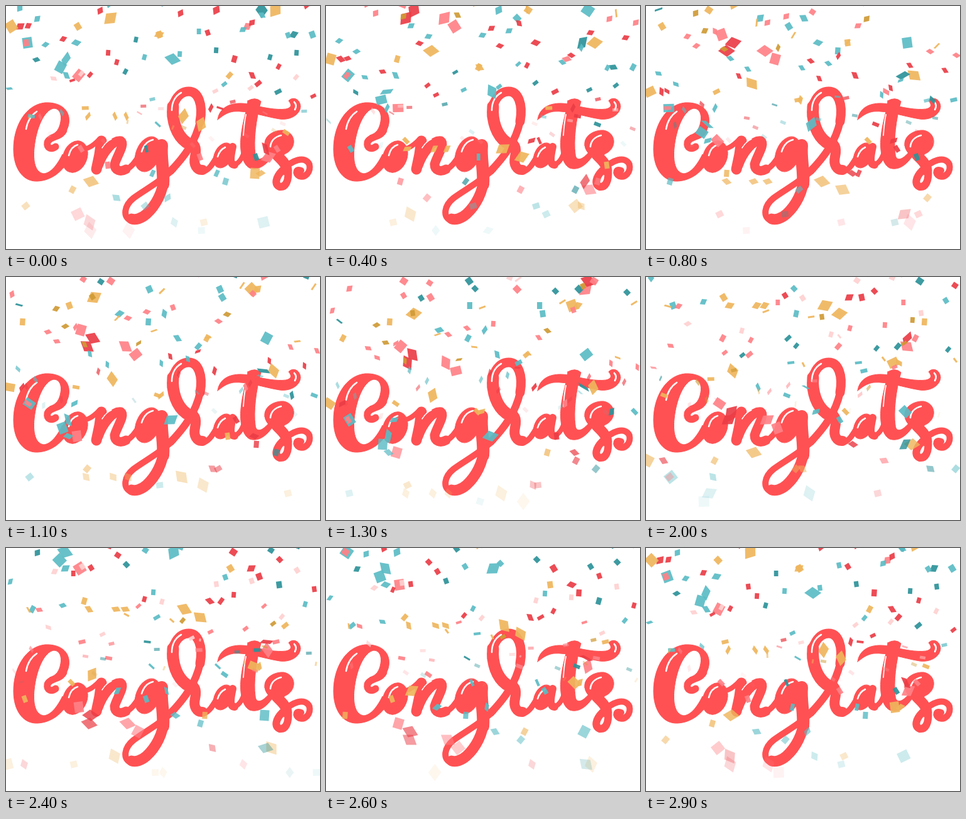
Animation, 500 px wide and 387 px high, one loop 3 s. Source, as an HTML page without scripts:

```html
<!DOCTYPE html>
<html lang="en">
<head>
<meta charset="utf-8">
<title>Congrats</title>
<style>
html, body { margin: 0; width: 500px; height: 387px; overflow: hidden; background: #fff; }
svg, .confetti { position: absolute; left: 0; top: 0; width: 500px; height: 387px; overflow: hidden; }

/* lettering */
.ink { fill: none; stroke: #ff5153; stroke-width: 12; stroke-linecap: round; stroke-linejoin: round; }
.ink .full { fill: #ff5153; stroke-width: 1; }
.shine { fill: none; stroke: #fff; stroke-width: 2.6; stroke-linecap: round; }

/* confetti: --x is the column, --a the age in tenths of a second at the start */
i {
  position: absolute; top: 0; left: calc(var(--x) * 1px);
  width: var(--s); height: var(--s); margin: calc(var(--s) / -2);
  background: var(--c); transform: skewX(var(--k));
  --s: 11px; --k: 0deg; --r: 10deg; --d: 8px; --flat: .5;
  animation: fall 3s steps(30) infinite, spin 3s steps(30) infinite,
             flip 3s steps(15) infinite, fade 3s steps(9) infinite;
  animation-delay: calc(var(--a) * -.1s);
}
.r { --c: #ea3d46; }
.p { --c: #ff8187; }
.t { --c: #5bbcc4; }
.o { --c: #efb55c; }
.d { --c: #2d9299; }
.b { --s: 17px; --flat: .75; }
i:nth-child(2n) { --d: -8px; }
i:nth-child(3n) { --k: -18deg; --r: 130deg; }
i:nth-child(5n) { --k: 16deg; --r: 65deg; }
i:nth-child(7n) { --r: 210deg; --flat: .25; }

/* small pieces, scattered by overlapping cycles */
.dust i {
  --s: 9px; --x: calc(var(--u) + var(--v)); --a: calc(var(--g) + var(--h)); --h: 0;
  margin-top: calc(var(--v) * .14px - 10px);
  animation-name: fall, spin, flip, wane;
}
.dust i:nth-child(5n) { --u: 0; }
.dust i:nth-child(5n+1) { --u: 200; }
.dust i:nth-child(5n+2) { --u: 400; }
.dust i:nth-child(5n+3) { --u: 100; }
.dust i:nth-child(5n+4) { --u: 300; }
.dust i:nth-child(7n) { --v: 8; }
.dust i:nth-child(7n+1) { --v: 64; }
.dust i:nth-child(7n+2) { --v: 22; }
.dust i:nth-child(7n+3) { --v: 92; }
.dust i:nth-child(7n+4) { --v: 36; }
.dust i:nth-child(7n+5) { --v: 78; }
.dust i:nth-child(7n+6) { --v: 50; }
.dust i:nth-child(6n) { --g: 0; }
.dust i:nth-child(6n+1) { --g: 15; }
.dust i:nth-child(6n+2) { --g: 5; }
.dust i:nth-child(6n+3) { --g: 25; }
.dust i:nth-child(6n+4) { --g: 10; }
.dust i:nth-child(6n+5) { --g: 20; }
.dust i:is(:nth-child(11n+1), :nth-child(11n+6)) { --h: 1; }
.dust i:is(:nth-child(11n+4), :nth-child(11n+8)) { --h: 2; }
.dust i:is(:nth-child(11n+2), :nth-child(11n+9)) { --h: 3; }
.dust i:is(:nth-child(11n+5), :nth-child(11n+10)) { --h: 4; }
.dust i:nth-child(4n) { --c: #ea3d46; }
.dust i:nth-child(4n+1) { --c: #efb55c; }
.dust i:nth-child(4n+2) { --c: #5bbcc4; }
.dust i:nth-child(4n+3) { --c: #ff8187; }
.dust i:nth-child(8n+5) { --c: #cf9a35; }
.dust i:nth-child(9n+2) { --c: #2d9299; }
.dust i:nth-child(9n+4) { --c: #ffd0d0; }
.dust i:nth-child(8n+1) { width: 3px; height: 13px; }

@keyframes fall { from { translate: 0 -20px; } to { translate: var(--d) 370px; } }
@keyframes spin { from { rotate: var(--r); } to { rotate: calc(var(--r) + 360deg); } }
@keyframes flip { 0%, 100% { scale: 1 1; } 50% { scale: 1 var(--flat); } }
@keyframes fade { 0%, 70% { opacity: .92; } 100% { opacity: 0; } }
@keyframes wane { 0%, 38% { opacity: .92; } 62%, 100% { opacity: 0; } }
</style>
</head>
<body>
<svg viewBox="0 0 500 387" role="img" aria-label="Congrats">
  <g class="ink">
    <!-- C -->
    <path class="full" d="M86 208C97 202 102 190 100 177C97 160 80 153 62 154C32 157 12 190 12 228C12 260 28 280 50 279C72 278 90 264 99 246L90 236C82 252 72 266 60 267C46 265 43 246 45 226C48 196 60 166 76 163C86 163 89 174 87 184C85 196 80 203 70 206Z"/>
    <path stroke-width="11" d="M92 198C86 210 70 207 66 217C64 227 73 229 79 224"/>
    <!-- o -->
    <ellipse class="full" cx="110" cy="240" rx="19" ry="26" transform="rotate(22 110 240)"/>
    <path stroke-width="8" d="M118 222C124 232 136 226 150 211"/>
    <!-- n -->
    <path stroke-width="17" d="M152 215C150 234 147 248 144 260"/>
    <path stroke-width="15" d="M147 254C154 234 170 213 183 215C190 220 176 240 173 252C173 262 182 265 191 260"/>
    <path stroke-width="9" d="M191 261C201 256 207 247 213 236"/>
    <!-- g -->
    <ellipse class="full" cx="226" cy="236" rx="19" ry="29" transform="rotate(22 226 236)"/>
    <path stroke-width="20" d="M248 222C246 245 252 262 250 284"/>
    <path stroke-width="17" d="M251 272C251 296 238 318 224 331C215 339 206 341 200 339"/>
    <path stroke-width="10" d="M200 342C185 337 188 318 203 306C220 293 248 279 267 259"/>
    <path stroke-width="12" d="M262 263C284 240 302 216 309 184"/>
    <!-- r -->
    <path stroke-width="15" d="M309 184C314 156 306 136 291 136C274 136 263 156 264 176"/>
    <path stroke-width="19" d="M266 160C264 184 272 206 287 217"/>
    <path stroke-width="16" d="M287 218C302 216 304 226 301 240C298 253 304 262 313 261"/>
    <path stroke-width="9" d="M313 264C324 262 331 248 337 238"/>
    <!-- a -->
    <ellipse class="full" cx="346" cy="238" rx="14" ry="21" transform="rotate(26 346 238)"/>
    <path stroke-width="12" d="M361 224C357 242 356 252 364 253"/>
    <path stroke-width="8" d="M364 253C373 249 377 240 381 228"/>
    <!-- t -->
    <path class="full" d="M385 151Q397 144 406 152C398 180 394 215 397 236C398 248 408 246 420 231L425 238C413 256 400 262 388 258C376 252 372 230 374 210C376 185 384 166 385 151Z"/>
    <path class="full" d="M337 181C340 160 360 152 385 156C410 162 430 166 446 164C454 162 456 158 450 151C456 144 468 147 469 160C468 174 452 182 436 180C410 176 385 166 362 168C350 170 344 176 337 181Z"/>
    <!-- s -->
    <path class="full" d="M412 222C410 206 428 197 442 198C460 201 464 222 449 233Q438 238 440 244L424 240Q413 232 412 222Z"/>
    <path stroke-width="17" d="M423 222C426 240 446 244 447 262"/>
    <path d="M449 260C451 279 445 289 436 288C427 285 429 273 440 262"/>
    <path stroke-width="10" d="M440 262C455 245 476 238 483 252C486 264 477 274 467 271C459 267 462 258 470 262"/>
  </g>
  <g class="shine">
    <path d="M32 196C34 184 40 174 49 168"/>
    <path d="M100 238C102 229 107 223 114 221"/>
    <path d="M153 226Q160 215 168 212" stroke-width="1.5"/>
    <path d="M216 232C219 222 225 215 234 213"/>
    <path d="M264 166C264 153 270 143 279 138"/>
    <path d="M337 240C339 233 343 228 349 225"/>
    <path d="M382 173Q379 188 378 206" stroke-width="1.8"/>
    <path d="M421 224C422 214 429 208 438 206"/>
    <path d="M459 153Q464 158 460 165"/>
  </g>
</svg>

<div class="confetti">
  <i class="t b" style="--x:32;--a:6"></i>
  <i class="p b" style="--x:118;--a:10"></i>
  <i class="r" style="--x:389;--a:10"></i>
  <i class="o" style="--x:245;--a:5"></i>
  <i class="o b" style="--x:306;--a:16"></i>
  <i class="o" style="--x:134;--a:15"></i>
  <i class="t" style="--x:227;--a:22"></i>
  <i class="t" style="--x:228;--a:26"></i>
  <i class="r" style="--x:21;--a:4"></i>
  <i class="d" style="--x:459;--a:5"></i>
  <i class="t" style="--x:486;--a:5"></i>
  <i class="t" style="--x:113;--a:6"></i>
  <i class="r" style="--x:361;--a:8"></i>
  <i class="r" style="--x:344;--a:14"></i>
  <i class="o" style="--x:399;--a:22"></i>
  <i class="p" style="--x:167;--a:21"></i>
  <i class="o" style="--x:99;--a:24"></i>
  <i class="r b" style="--x:140;--a:28"></i>
  <i class="p b" style="--x:203;--a:0"></i>
  <i class="o b" style="--x:429;--a:2"></i>
  <i class="t b" style="--x:93;--a:8"></i>
  <i class="t b" style="--x:417;--a:28"></i>
  <i class="t" style="--x:303;--a:29"></i>
  <i class="r" style="--x:335;--a:2"></i>
  <i class="p b" style="--x:412;--a:20"></i>
  <i class="o" style="--x:358;--a:10"></i>
  <i class="r" style="--x:322;--a:14"></i>
  <i class="d" style="--x:228;--a:19"></i>
  <i class="t" style="--x:343;--a:23"></i>
  <i class="o" style="--x:177;--a:15"></i>
  <i class="p" style="--x:30;--a:6"></i>
  <i class="p b" style="--x:121;--a:27"></i>
  <i class="r b" style="--x:126;--a:29"></i>
  <i class="o" style="--x:322;--a:28"></i>
  <i class="d b" style="--x:406;--a:2"></i>
  <i class="t b" style="--x:267;--a:8"></i>
  <i class="o" style="--x:441;--a:17"></i>
  <i class="o b" style="--x:9;--a:4"></i>
  <i class="o" style="--x:242;--a:5"></i>
  <i class="p" style="--x:385;--a:4"></i>
  <i class="o b" style="--x:390;--a:22"></i>
  <i class="r b" style="--x:418;--a:19"></i>
  <i class="t b" style="--x:84;--a:9"></i>
  <i class="o" style="--x:115;--a:4"></i>
  <i class="o" style="--x:187;--a:15"></i>
  <i class="p" style="--x:124;--a:19"></i>
  <i class="p" style="--x:303;--a:20"></i>
  <i class="o b" style="--x:286;--a:15"></i>
  <i class="t" style="--x:237;--a:16"></i>
  <i class="o b" style="--x:141;--a:23"></i>
  <i class="p b" style="--x:187;--a:29"></i>
  <i class="d" style="--x:403;--a:20"></i>
  <i class="p" style="--x:426;--a:19"></i>
  <i class="t" style="--x:275;--a:28"></i>
  <i class="o b" style="--x:165;--a:3"></i>
  <i class="t" style="--x:341;--a:22"></i>
  <i class="t" style="--x:93;--a:10"></i>
  <i class="d" style="--x:436;--a:12"></i>
  <i class="o" style="--x:122;--a:14"></i>
  <i class="t" style="--x:182;--a:25"></i>
  <i class="o" style="--x:24;--a:26"></i>
  <i class="t" style="--x:44;--a:15"></i>
  <i class="t" style="--x:250;--a:25"></i>
  <i class="r" style="--x:404;--a:11"></i>
</div>
<div class="confetti dust">
  <i></i><i></i><i></i><i></i><i></i><i></i><i></i><i></i><i></i><i></i><i></i><i></i>
  <i></i><i></i><i></i><i></i><i></i><i></i><i></i><i></i><i></i><i></i><i></i><i></i>
  <i></i><i></i><i></i><i></i><i></i><i></i><i></i><i></i><i></i><i></i><i></i><i></i>
  <i></i><i></i><i></i><i></i><i></i><i></i><i></i><i></i><i></i><i></i><i></i><i></i>
  <i></i><i></i><i></i><i></i><i></i><i></i><i></i><i></i><i></i><i></i><i></i><i></i>
  <i></i><i></i><i></i><i></i><i></i><i></i><i></i><i></i><i></i><i></i><i></i><i></i>
  <i></i><i></i><i></i><i></i><i></i><i></i><i></i><i></i><i></i><i></i><i></i><i></i>
  <i></i><i></i><i></i><i></i><i></i><i></i><i></i><i></i><i></i><i></i><i></i><i></i>
</div>
</body>
</html>
```
